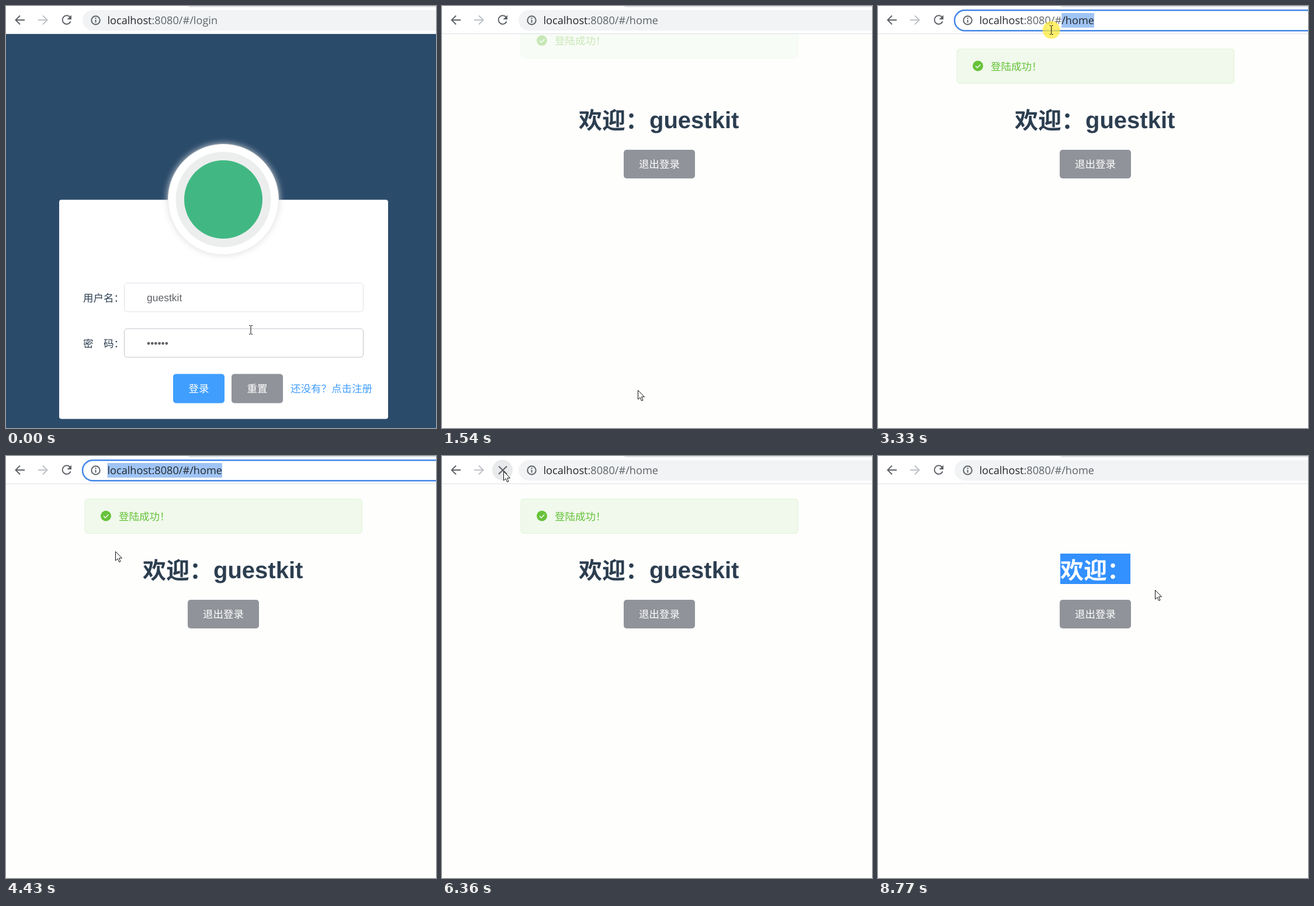
Recreate the animation shown at these times as an HTML page. Size 736x722 px, loop 9090 ms.

```html
<!DOCTYPE html>
<html lang="zh-CN">
<head>
<meta charset="utf-8">
<style>
  html, body { margin: 0; height: 100%; overflow: hidden; background: #fff; }
  svg { display: block; width: 736px; height: 722px; }
  text { font: 17.5px "Liberation Sans", "Noto Sans CJK SC", sans-serif; text-rendering: geometricPrecision; white-space: pre; }
  .cjk { font-family: "Noto Sans CJK SC", sans-serif; }
  .label { fill: #2c3e50; }
  .value { fill: #606266; }
  .button { fill: #fff; text-anchor: middle; }
  .title { font-size: 40px; font-weight: bold; fill: #2c3e50; }
  .url { font: 18.15px "Open Sans", "Noto Sans", sans-serif; fill: #25282c; }
  .field { fill: #fff; stroke: #dcdfe6; }
  .icon { fill: none; stroke: #5f6368; stroke-width: 2; }
  #cursor path { fill: #fff; stroke: #111; }
  #cursor #beam { fill: none; }
</style>
</head>
<body>
<svg viewBox="0 0 736 722">
  <g id="login">
    <rect width="736" height="722" fill="#2b4b6b"/>
    <rect x="91" y="331.5" width="563" height="375" rx="4" fill="#fff"/>
    <circle cx="372" cy="331" r="94.5" fill="#fff" stroke="#eee" style="filter:drop-shadow(0 0 6px #ddd)"/>
    <circle cx="372" cy="331" r="81.5" fill="#eceeee"/>
    <circle cx="372" cy="331" r="67" fill="#41b883"/>
    <rect class="field" x="202.5" y="474" width="409" height="49" rx="5"/>
    <rect class="field" id="password" x="202.5" y="552" width="409" height="49" rx="5"/>
    <text class="cjk label" x="132" y="505.5">用户名：</text>
    <text class="cjk label" x="132" y="583.5">密　码：</text>
    <text class="value" x="241" y="505">guestkit</text>
    <text class="value" x="241" y="583">••••••</text>
    <rect id="submit" x="286" y="629.5" width="88" height="50" rx="5"/>
    <rect x="386" y="629.5" width="88" height="50" rx="5" fill="#909399"/>
    <text class="cjk button" x="330" y="660.5">登录</text>
    <text class="cjk button" x="430" y="660.5">重置</text>
    <text class="cjk" x="487" y="660.5" fill="#409eff">还没有？点击注册</text>
  </g>

  <g id="home">
    <rect width="736" height="722" fill="#fefefd"/>
    <g id="title">
      <text class="cjk title" y="210">欢迎：</text>
      <text class="title" x="121" y="209">guestkit</text>
    </g>
    <g id="plainTitle">
      <text class="cjk title" x="312" y="210">欢迎：</text>
      <rect id="titleMark" x="312" y="167" height="52" fill="#3390ff"/>
      <text class="cjk title" id="titleSel" x="312" y="210" style="fill:#fff"></text>
    </g>
    <rect x="311" y="246" width="122" height="49" rx="5" fill="#909399"/>
    <text class="cjk button" x="372" y="276.5">退出登录</text>
    <g id="message">
      <rect x="135" y="73.5" width="474.5" height="59" rx="5" fill="#f0f9eb" stroke="#e1f3d8"/>
      <circle cx="171" cy="102.5" r="9" fill="#67c23a"/>
      <path d="M167 102.7l3 3 5.3-5.5" fill="none" stroke="#fff" stroke-width="1.4"/>
      <text class="cjk" x="193" y="109.6" fill="#67c23a">登陆成功！</text>
    </g>
  </g>

  <rect width="736" height="47" fill="#fff"/>
  <rect y="47" width="736" height="1" fill="#dcdfe3"/>
  <path d="M311 0H736V2H316Q313 2 311 0Z" fill="#dee1e6"/>
  <path class="icon" d="M32 24H17M24 16.5L16.5 24L24 31.5"/>
  <path class="icon" d="M55 24H70M63 16.5L70.5 24L63 31.5" style="stroke:#bdc1c6"/>
  <circle id="hover" cx="103.5" cy="24" r="17.5" fill="#e8eaeb"/>
  <g id="reload">
    <path class="icon" d="M109.5 19A7.3 7.3 0 1 0 110.6 26.5"/>
    <path d="M112 15.5V23H104.5Z" fill="#5f6368"/>
  </g>
  <path id="stop" class="icon" d="M97 17.5L111 31M111 17.5L97 31"/>
  <rect id="bar" width="640"/>
  <circle class="icon" cx="153.5" cy="24.5" r="7.2"/>
  <path class="icon" d="M153.5 20v2M153.5 23.5v5"/>
  <text class="url" x="173.5" y="31">localhost<tspan id="path" fill="#5f6368"></tspan></text>
  <rect id="urlMark" y="12" height="25" fill="#9fc4f5"/>
  <text class="url" id="urlSel" y="31"></text>

  <g id="cursor">
    <circle id="press" r="15" fill="#ffe93b" opacity=".75"/>
    <path id="beam" d="M-3 -7.5H-1L0 -6.5L1 -7.5H3M0 -6.5V6.5M-3 7.5H-1L0 6.5L1 7.5H3"/>
    <path id="arrow" d="M.5 .5V16L4 12.7L6.6 18.5L9 17.4L6.5 11.8H11.5Z"/>
    <path id="hand" transform="translate(-6.5)" d="M5 15V2.2C5 0 8.5 0 8.5 2.2V9C9 7.5 11.5 8 11.5 9.8C12 8.5 14.3 9 14.3 10.6C15 9.8 16.8 10.2 16.8 12V17C16.8 20 15 21 15 24H7C7 21 4 19 1 14.5C0 12.5 2.5 11 5 14"/>
  </g>
</svg>
<script>
const LOOP = 9090;
const $ = id => document.getElementById(id);
const urlText = document.querySelector('.url');

// time, x, y, and the pointer shape from that time on
const track = [
  [0, 419, 554, 'beam'], [130, 419, 554, 'beam'], [290, 378, 602, 'arrow'], [350, 354, 632, 'hand'],
  [480, 335, 657, 'hand'], [1470, 335, 657, 'arrow'], [1800, 335, 657, 'arrow'], [2100, 357, 327, 'arrow'],
  [2190, 390, 225, 'beam'], [2230, 403, 213, 'beam'], [2430, 403, 213, 'arrow'], [2640, 382, 40, 'beam'],
  [2720, 375, 26, 'beam'], [2830, 375, 26, 'beam'], [3330, 297, 41, 'beam'], [3900, 137, 57, 'beam'],
  [4130, 137, 57, 'arrow'], [4300, 168, 135, 'arrow'], [4430, 187, 163, 'arrow'], [4970, 187, 163, 'arrow'],
  [5670, 105, 26, 'arrow'], [6910, 105, 26, 'arrow'], [7150, 24, 110, 'arrow'], [7500, 290, 190, 'beam'],
  [7560, 308, 196, 'beam'], [7810, 388, 200, 'beam'], [8020, 428, 200, 'beam'], [8440, 428, 200, 'beam'],
  [8520, 440, 208, 'arrow'], [8770, 474, 229, 'arrow'], [LOOP, 474, 229, 'arrow']
];
const presses = [[1200, 1340], [2770, 4080], [4700, 4770], [5740, 5870], [7560, 8270]];

const within = (t, from, to) => t >= from && t < to;
const show = (id, on) => $(id).setAttribute('display', on ? 'inline' : 'none');
const set = (id, attrs) => Object.entries(attrs).forEach(([k, v]) => $(id).setAttribute(k, v));
const easeOut = p => 1 - (1 - Math.min(1, Math.max(0, p))) ** 3;

function pointerAt(t) {
  const i = track.findIndex(k => k[0] > t) - 1;
  const [t0, x0, y0, shape] = track[i], [t1, x1, y1] = track[i + 1];
  const p = (t - t0) / (t1 - t0);
  return { x: x0 + (x1 - x0) * p, y: y0 + (y1 - y0) * p, shape };
}

function drawUrl(t, x, onHome) {
  const focused = within(t, 2770, 4700);
  const path = onHome ? ':8080/#/home' : ':8080/#/login';
  if ($('path').textContent !== path) $('path').textContent = path;
  set('bar', focused
    ? { x: 131, y: 7.2, height: 35, rx: 17.5, fill: '#fff', stroke: '#4386e8', 'stroke-width': 2.5 }
    : { x: 131, y: 7, height: 35, rx: 17.5, fill: '#f1f3f4', stroke: 'none' });
  show('urlMark', focused);
  show('urlSel', focused);
  if (!focused) return;

  const text = urlText.textContent;
  const edges = [...text].map((_, i) => urlText.getStartPositionOfChar(i).x);
  const end = urlText.getEndPositionOfChar(text.length - 1).x;
  const edge = t > 3900 ? 0 : x + 14;
  const near = v => Math.abs(v - edge);
  let start = 0;
  edges.forEach((v, i) => { if (near(v) < near(edges[start])) start = i; });
  const empty = edge > end;
  const left = empty ? end : edges[start];
  set('urlMark', { x: left, width: end - left });
  set('urlSel', { x: left });
  $('urlSel').textContent = empty ? '' : text.slice(start);
}

function drawHome(t, x) {
  const reloaded = t >= 6630;
  show('title', !reloaded);
  show('plainTitle', reloaded);
  $('title').setAttribute('transform', 'translate(234)');
  const reach = t > 8020 ? 428 : x;
  const count = t < 7560 ? 0 : Math.min(3, Math.max(0, Math.round((reach - 312) / 40)));
  set('titleMark', { width: count * 40 });
  $('titleSel').textContent = '欢迎：'.slice(0, count);

  show('message', !reloaded);
  const age = t - 1500;
  set('message', {
    opacity: easeOut(age / 300),
    transform: `translate(0 ${-60 * (1 - easeOut(age / 400))})`
  });
}

function draw() {
  const t = performance.now() % LOOP;
  const { x, y, shape } = pointerAt(t);
  const pressed = presses.some(([from, to]) => within(t, from, to));
  const onHome = t >= 1470;

  show('login', !onHome);
  show('home', onHome);
  $('password').style.stroke = t < 290 ? '#c0c4cc' : '#dcdfe6';
  set('submit', { fill: t < 350 ? '#409eff' : pressed ? '#3a8ee6' : '#62aeff' });
  drawHome(t, x);

  show('hover', Math.hypot(x - 103.5, y - 24) < 17.5);
  const loading = within(t, 6360, 6700);
  show('reload', !loading);
  show('stop', loading);
  drawUrl(t, x, onHome);

  set('cursor', { transform: `translate(${x} ${y})` });
  show('press', pressed);
  for (const id of ['beam', 'arrow', 'hand']) show(id, id === shape);
  requestAnimationFrame(draw);
}
draw();
</script>
</body>
</html>
```
